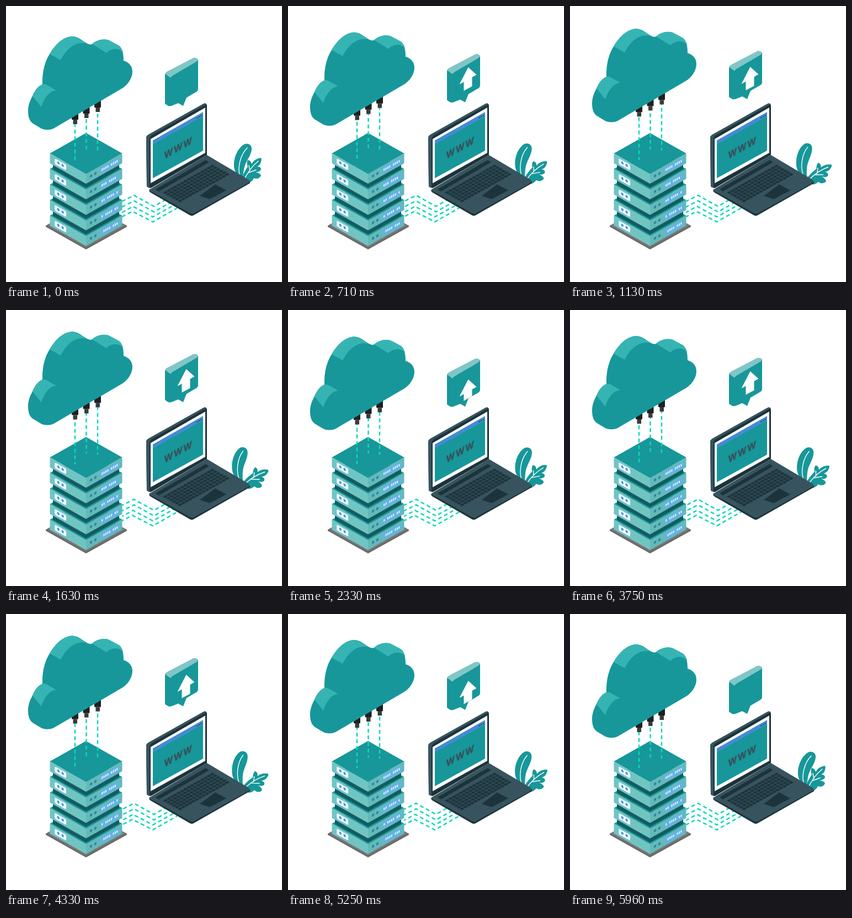
Animation of 500 by 500 pixels, one loop 6000 ms. Source, as an HTML page:

```html
<!DOCTYPE html>
<html lang="en">
<head>
<meta charset="utf-8">
<title>Cloud upload</title>
<style>
  html, body { margin: 0; width: 100%; height: 100%; overflow: hidden; background: #fff; }
  svg { display: block; width: 100vw; height: 100vh; }
  .main { fill: #17979a; }
  .light { fill: #36b4b3; }
  .flow { fill: none; stroke: #0cd9b9; stroke-width: 2.5; stroke-dasharray: 7 5; }
  .vein { fill: none; stroke: #fff; stroke-width: 1.4; stroke-linecap: round; }
  .www { font: bold 18px "Liberation Sans", Arial, sans-serif; letter-spacing: 3px; fill: #37535f; stroke: #37535f; stroke-width: .7; }
</style>
</head>
<body>
<svg viewBox="0 0 500 500">
  <defs>
    <clipPath id="face">
      <path d="M298 130L348 100V150Q348 154 344 156L302 180Q298 182 297 181Z"/>
    </clipPath>
  </defs>

  <g id="rack"></g>
  <g id="wires"></g>
  <g id="drops"></g>

  <g id="cloud">
    <g id="plugs"></g>
    <path class="main" d="M40 190C40 181 43 172 48 163C53 151 60 144 66 142C65 116 72 98 79 87C92 65 107 55 121 55C130 55 140 64 147 68Q153 71 156 69C166 60 181 58 190 64L205 72C211 78 213 86 213 99C223 102 229 109 229 119C229 131 220 144 209 150L86 222C79 225 71 225 64 222L49 213C42 208 40 200 40 190Z"/>
    <path class="light" d="M79 87C92 65 107 55 121 55Q125 55 147 68C126 63 110 77 99 98Z"/>
    <path class="light" d="M156 69C166 60 181 58 190 64L205 72Q210 76 212 84C203 74 189 77 182 85Z"/>
    <path class="light" d="M48 163C53 151 60 144 66 142Q70 141 74 143L91 153C79 153 69 167 64 183Z"/>
  </g>

  <g id="bubble">
    <path class="main" d="M288 125Q288 121 292 119L338 95Q343 92 348 97V150Q348 154 344 156L327 166L321 181L312 176L302 180Q298 182 294 181L288 177Z"/>
    <path fill="#80c6c6" d="M288.500 123Q289 121 292 119L338 95Q343 92 348 97Q347 100 343 102L302 126Q299 128 298 130Z"/>
    <g clip-path="url(#face)">
      <path id="arrow" fill="#fff" d="M0 0L15 13.500L7 18V34.500L-8 42.500V26.500L-16 31Z"/>
    </g>
  </g>

  <g id="leafA">
    <path class="main" d="M424 312C416 303 412 295 413 285C414 270 422 255 433 250C440 248 446 253 445 260C444 272 433 282 431 296C430 303 429 308 429 314Z"/>
    <path class="vein" d="M423 305C420 292 424 270 437 257"/>
  </g>
  <g id="leafB">
    <path class="main" d="M426 318C429 305 434 297 438 291Q435 283 438 279Q444 280 445 286Q450 277 461 275Q464 276 462 282Q461 288 455 291Q462 291 462 296Q460 301 452 301Q461 303 462 307Q458 315 449 312Q446 318 441 320Z"/>
    <path class="vein" d="M431 316C437 302 446 290 457 281M442 298L440 289M439 302L453 297"/>
  </g>

  <g id="laptop">
    <path fill="#1d333c" d="M259 333L338 376L442 318V321L340 379Q337 381 333 379L262 338Q259 336 259 333Z"/>
    <path fill="#37545e" d="M259 333L364 270L440 315Q443 318 440 320L341 375Q337 377 333 375Z"/>
    <path fill="#1d333c" d="M271 332L362 279L368 283L277 336Z"/>
    <path fill="#1d333c" d="M351 344L379 323L399 334L369 350Z"/>
    <g id="keys" fill="#1d333c" transform="matrix(.91 -.51 .32 .18 284 338)"></g>
    <path fill="#1d333c" d="M254 239Q254 235 258 233L358 177Q363 175 364 180V270L264 329Q260 331 255 327Z"/>
    <path fill="#37545e" d="M254 238Q255 235 258 233L358 177Q362 175 363 178L264 234Q260 237 260 242V329Q257 329 255 327Z"/>
    <path fill="#fff" d="M262 241L361 184V266L262 321Z"/>
    <path fill="#438bd3" d="M266 243.500L357 192V200L266 251Z"/>
    <path class="main" d="M266 250.500L357 199.500V262L266 312Z"/>
    <g fill="#1d333c"><circle cx="346.500" cy="202.500" r="1.100"/><circle cx="350" cy="200.500" r="1.100"/><circle cx="353.500" cy="198.500" r="1.100"/></g>
    <text class="www" transform="matrix(.87 -.49 0 1 287 277)">WWW</text>
  </g>
</svg>
<script>
  const LOOP = 6000, HALF = 3000;
  const $ = id => document.getElementById(id);

  function add(parent, tag, attrs) {
    const el = document.createElementNS("http://www.w3.org/2000/svg", tag);
    for (const k in attrs) el.setAttribute(k, attrs[k]);
    parent.appendChild(el);
    return el;
  }
  const poly = (g, fill, points) => add(g, "polygon", { fill, points });
  const diamond = (g, fill, y, w, h) =>
    poly(g, fill, `${145 - w},${y} 145,${y - h} ${145 + w},${y} 145,${y + h}`);

  // Box sides that hang below a diamond centred at height y
  function sides(g, left, right, y, w, h, depth) {
    poly(g, left, `${145 - w},${y} 145,${y + h} 145,${y + h + depth} ${145 - w},${y + depth}`);
    poly(g, right, `${145 + w},${y} 145,${y + h} 145,${y + h + depth} ${145 + w},${y + depth}`);
  }

  function server(y, row) {
    const g = $("rack");
    diamond(g, "#17979a", y, 65.5, 37);
    if (row) {
      diamond(g, "#125c62", y, 60, 34);
      sides(g, "#125c62", "#125c62", y - 11, 60, 34, 11);
    }
    sides(g, "#70c5c3", "#62bab8", y, 65.5, 37, 18);

    const left = add(g, "g", { transform: `matrix(.87 .49 0 1 80 ${y})` });
    add(left, "rect", { x: 9.5, y: 4, width: 24, height: 10.5, rx: 2.5, fill: "#eef8ff" });
    for (const x of [17, 26]) add(left, "circle", { cx: x, cy: 9, r: 2.5, fill: "#4b91df" });

    const right = add(g, "g", { transform: `matrix(.87 -.49 0 1 145 ${y + 37})` });
    for (const x of [10.5, 19.5]) add(right, "circle", { cx: x, cy: 9, r: 2.5, fill: "#327fa9" });
    add(right, "rect", { x: 30, y: 4.5, width: 39, height: 9.5, rx: 1, fill: "#65b1f0" });
    for (let i = 0; i < 9; i++) {
      if ((i + row) % 5 === 4) continue;
      add(right, "rect", { x: 32.5 + i * 3.9, y: 7, width: 2.2, height: 4, fill: "#eef8ff" });
    }
  }

  poly($("rack"), "#69696b", "72,398 145,357 219,398 219,400 145,441 72,400");
  diamond($("rack"), "#7a7778", 397.5, 72, 40);
  for (let row = 4; row >= 0; row--) server(267 + row * 28.2, row);

  [[125, 279], [145.5, 260], [166, 262]].forEach(([x, y], i) => {
    const top = 196 - i * 11;
    add($("drops"), "path", { class: "flow", d: `M${x} ${y}V${top - 8}` });
    add($("plugs"), "rect", { x: x - 6, y: top - 12, width: 12, height: 22, rx: 1, fill: "#1e1f21" });
    add($("plugs"), "rect", { x: x - 3.5, y: top + 10, width: 7.5, height: 8, fill: "#3b3b3d" });
  });

  for (const d of [
    "M210 354L232 343L268 363L289 351",
    "M210 364L232 353L268 373L298 356",
    "M210 374L230 363L266 382L304 361",
    "M210 382L229 372L266 391L310 366"
  ]) add($("wires"), "path", { class: "flow", d });

  for (let r = 0; r < 6; r++) {
    for (let c = 0; c < 15; c++) {
      add($("keys"), "rect", { x: c * 6.67, y: r * 16.7, width: 5.6, height: 13.5 });
    }
  }

  const RISE = [[0, 174], [130, 144], [400, 121], [710, 111], [1330, 110],
                [1630, 107], [2250, 121], [2700, 148], [3000, 174]];

  function track(steps, t) {
    const i = steps.findIndex(s => s[0] > t);
    const [t0, a] = steps[i - 1], [t1, b] = steps[i];
    return a + (b - a) * (t - t0) / (t1 - t0);
  }

  const move = (id, value) => $(id).setAttribute("transform", value);
  const flows = document.querySelectorAll(".flow");

  function draw(now) {
    const t = now % LOOP, u = t % HALF;
    const p = (1 - Math.cos(2 * Math.PI * u / HALF)) / 2;
    const lift = -14.3 * p;
    move("cloud", `translate(0 ${-16 * p})`);
    move("bubble", `translate(0 ${lift})`);
    move("arrow", `translate(326.5 ${track(RISE, u) - lift})`);
    move("leafA", `rotate(${-8 * p} 424 312)`);
    move("leafB", `rotate(${22 * p} 430 318)`);
    flows.forEach(f => { f.style.strokeDashoffset = -12 * (t / 600); });
  }

  const start = performance.now();
  function tick() {
    draw(performance.now() - start);
    requestAnimationFrame(tick);
  }
  draw(0);
  requestAnimationFrame(tick);
</script>
</body>
</html>
```
